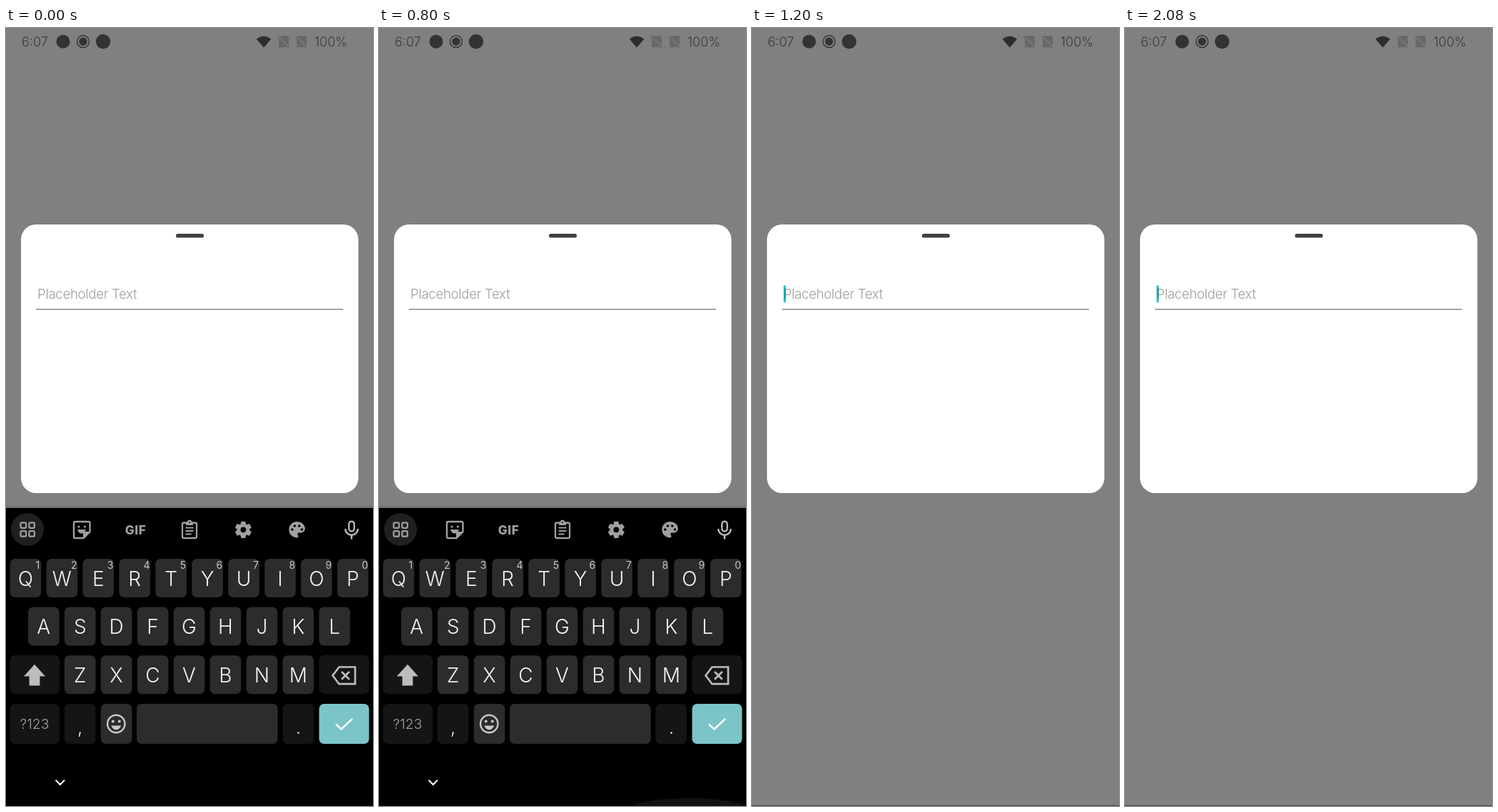
Write an HTML page with a canvas that moves like this. It is 514 px wide and 1089 px high and loops after 2560 ms.

```html
<!DOCTYPE html>
<html lang="en">
<head>
<meta charset="utf-8">
<title>Bottom sheet with keyboard</title>
<style>
  html, body { margin: 0; width: 100%; height: 100%; overflow: hidden; background: #808080; }
  canvas { display: block; width: 100%; height: 100%; }
</style>
</head>
<body>
<canvas id="stage" width="514" height="1089"></canvas>
<script>
const W = 514, H = 1089, LOOP = 2560, STEP = 80, KB_TOP = 672;
const FONT = 'Inter, "Liberation Sans", sans-serif';
const KEY = '#2c2c2c', DARK_KEY = '#151515', ICON = '#a0a0a0', BRIGHT = '#bcbcbc';
const PITCH = 50.93, KEY_W = 43.6, KEY_H = 54;

const screen = document.getElementById('stage').getContext('2d');
let g = screen;

function box(x, y, w, h, r, fill) {
  g.beginPath();
  g.roundRect(x, y, w, h, r);
  g.fillStyle = fill;
  g.fill();
}

function disc(x, y, r, fill) {
  g.beginPath();
  g.arc(x, y, r, 0, Math.PI * 2);
  g.fillStyle = fill;
  g.fill();
}

function stroke(path, color, width) {
  g.strokeStyle = color;
  g.lineWidth = width;
  g.stroke(new Path2D(path));
}

function fill(path, color) {
  g.fillStyle = color;
  g.fill(new Path2D(path));
}

function text(str, x, y, size, color, weight = 300, align = 'left', spacing = 0) {
  g.font = `${weight} ${size}px ${FONT}`;
  g.textAlign = align;
  g.letterSpacing = spacing + 'px';
  g.fillStyle = color;
  g.fillText(str, x, y);
  g.letterSpacing = '0px';
}

// Status bar and sheet

function noSim(x) {
  fill(`M${x + 4} 11H${x + 16}V25L${x + 2} 11ZM${x + 2} 14L${x + 14.5} 27H${x + 2}Z`, '#686868');
  stroke(`M${x} 11.5L${x + 16} 28`, '#686868', 1.2);
}

function statusBar() {
  text('6:07', 22, 26, 18, '#3a3a3a');
  disc(80, 19, 9.5, '#333');
  disc(108, 19, 5.7, '#333');
  g.beginPath();
  g.arc(108, 19, 8.5, 0, Math.PI * 2);
  g.strokeStyle = '#333';
  g.lineWidth = 1.4;
  g.stroke();
  disc(136, 19, 10.2, '#333');
  fill('M361 27.5L350.8 15.5Q361 7.5 371.2 15.5Z', '#2d2d2d');
  noSim(380);
  noSim(405);
  text('100%', 432, 26, 18, '#3a3a3a');
}

function sheet(cursorOn) {
  box(21, 275, 472.5, 376, 21, '#fff');
  box(238, 288, 39, 5.6, 2.5, '#414141');
  if (cursorOn) box(44.3, 360.5, 3, 23.5, 0, '#1cbfc3');
  text('Placeholder Text', 44, 379.3, 18.7, 'rgba(0,0,0,.39)', 300, 'left', -0.35);
  box(42, 393, 430, 1.5, 0, '#8c888a');
}

// Keyboard, drawn at its resting place

function gridIcon() {
  disc(30, 702, 23, '#202020');
  g.strokeStyle = ICON;
  g.lineWidth = 2.2;
  for (const x of [20.5, 32.3])
    for (const y of [692.3, 704.1]) {
      g.beginPath();
      g.roundRect(x, y, 7.6, 7.6, 1.8);
      g.stroke();
    }
}

function micIcon() {
  stroke('M480.3 694.3a3.7 3.7 0 0 1 7.4 0v6.4a3.7 3.7 0 0 1-7.4 0z', BRIGHT, 2.3);
  stroke('M475.2 701a8.8 8.8 0 0 0 17.6 0M484 710v5.5', BRIGHT, 2.4);
}

function tools() {
  // sticker
  stroke('M97 691H115.5Q117.5 691 117.5 693V705L108.5 714H97Q95 714 95 712V693Q95 691 97 691Z', ICON, 2.4);
  fill('M108 714V707Q108 705 110 705H118Z', ICON);
  disc(102, 698, 1.6, ICON);
  disc(110.5, 698, 1.6, ICON);
  fill('M100 702H112Q110 707.5 105.8 707.5T100 702Z', ICON);

  text('GIF', 181.5, 708.6, 17.2, ICON, 800, 'center', 0.6);

  // clipboard
  stroke('M249 692.5H265Q267 692.5 267 694.5V712Q267 714 265 714H249Q247 714 247 712V694.5Q247 692.5 249 692.5Z', ICON, 2.3);
  box(252, 691.5, 10, 4.5, 1, ICON);
  disc(257, 691.5, 3, ICON);
  disc(257, 692, 1, '#000');
  stroke('M251.5 699.5H262.5M251.5 704H262.5M251.5 708.5H259.5', ICON, 2);

  // gear
  for (let i = 0; i < 6; i++) {
    g.save();
    g.translate(332.3, 702.3);
    g.rotate(i * Math.PI / 3);
    fill('M-3 -11.6H3L4 -6H-4Z', ICON);
    g.restore();
  }
  disc(332.3, 702.3, 8.8, ICON);
  disc(332.3, 702.3, 3.9, '#000');

  // palette
  fill('M407.5 691A11.2 11.2 0 1 0 407.5 713.4C409.6 713.4 410 711.3 408.9 710C407.6 708.4 408.6 706.6 410.5 706.6H412.8C416.3 706.6 418.8 704 418.8 700.6C418.8 695.4 413.8 691 407.5 691Z', ICON);
  for (const [x, y] of [[400.8, 702], [404.3, 697], [410.7, 697], [414.4, 702]]) disc(x, y, 1.8, '#000');
}

function keyRow(letters, x, y, lower) {
  [...letters].forEach((c, i) => {
    const kx = x + i * PITCH;
    box(kx, y, KEY_W, KEY_H, 7, KEY);
    text(lower ? c.toLowerCase() : c, kx + KEY_W / 2, y + (lower ? 34 : 37.7), 28, '#f4f4f4', 300, 'center');
  });
}

function keyboard(lower) {
  box(0, KB_TOP, W, H - KB_TOP + 1, 0, '#000');
  gridIcon();
  micIcon();
  if (!lower) tools();

  keyRow('QWERTYUIOP', 5.6, 743, lower);
  [...'1234567890'].forEach((d, i) => text(d, 44.3 + i * PITCH, 756.5, 14, '#c8c8c8', 400, 'center'));
  keyRow('ASDFGHJKL', 31, 810.5, lower);
  keyRow('ZXCVBNM', 81.9, 878.3, lower);

  // shift
  box(5.6, 878, 69.4, KEY_H, 7, DARK_KEY);
  const arrow = 'M40 892L53 906.5H46.5V919.5H33.5V906.5H27Z';
  if (!lower) fill(arrow, BRIGHT);
  stroke(arrow, BRIGHT, lower ? 2.6 : 1.8);

  // backspace
  box(438.5, 878, 70, KEY_H, 7, DARK_KEY);
  stroke('M457.5 906.3L466.5 894.5H489V918.2H466.5Z', BRIGHT, 2.7);
  stroke('M470 901L480.8 911.8M480.8 901L470 911.8', BRIGHT, 2.7);

  const y = 946, h = 56;
  box(5.6, y, 69.4, h, 7, DARK_KEY);
  text('?123', 40, 981, 19.3, '#a4a4a4', 300, 'center');
  box(81.9, y, KEY_W, h, 7, DARK_KEY);
  text(',', 103.7, 988, 26, '#eee', 300, 'center');
  box(132.8, y, KEY_W, h, 7, KEY);
  g.beginPath();
  g.arc(154.3, 974, 12.2, 0, Math.PI * 2);
  g.strokeStyle = '#c8c8c8';
  g.lineWidth = 2.4;
  g.stroke();
  disc(149.8, 970.5, 2, '#c8c8c8');
  disc(158.8, 970.5, 2, '#c8c8c8');
  fill('M147.3 976.5H161.3Q159 982.3 154.3 982.3T147.3 976.5Z', '#c8c8c8');
  box(183, y, 197.6, h, 7, KEY);
  box(387.6, y, KEY_W, h, 7, DARK_KEY);
  text('.', 409.3, 988, 26, '#eee', 300, 'center');
  box(438.5, y, 70, h, 7, '#7bc4c7');
  stroke('M462 974.5L469.5 981.5L485 967', '#fff', 2.5);

  if (!lower) stroke('M69.5 1052.8L75.8 1059L82 1052.8', '#fff', 2);
}

function layer(lower) {
  const c = document.createElement('canvas');
  c.width = W;
  c.height = H;
  g = c.getContext('2d');
  keyboard(lower);
  g = screen;
  return c;
}

const upperKeys = layer(false), lowerKeys = layer(true);

function keyboardPose(t) {
  if (t < 880) return { keys: upperKeys, dy: 0, alpha: 1 };
  if (t < 960) return { keys: lowerKeys, dy: 35, alpha: 0.67 };
  if (t < 1120) return { keys: lowerKeys, dy: 279, alpha: 0.11 };
  return null;
}

// Touch ripple rising past the bottom edge: start, x, rx, ry, alpha
const RIPPLE = [[720, 435, 60, 8, 0.2], [800, 435, 92, 20, 0.25], [880, 435, 87, 40, 0.25], [960, 432, 66, 40, 0.1]];

function ripple(t) {
  const now = t < 1120 && RIPPLE.findLast(r => t >= r[0]);
  if (!now) return;
  const [, x, rx, ry, a] = now;
  g.beginPath();
  g.ellipse(x, H - 1 + ry / 2, rx, ry, 0, 0, Math.PI * 2);
  g.fillStyle = `rgba(68,68,68,${a})`;
  g.fill();
}

const cursorOn = t => (t >= 80 && t < 560) || (t >= 1120 && t < 1600) || t >= 2080;

function draw(t) {
  box(0, 0, W, H, 0, '#808080');
  box(0, H - 1, W, 1, 0, '#444');
  statusBar();
  sheet(cursorOn(t));
  const pose = keyboardPose(t);
  if (pose) {
    if (pose.dy === 0) {
      const shade = g.createLinearGradient(0, KB_TOP - 4, 0, KB_TOP);
      shade.addColorStop(0, 'rgba(0,0,0,0)');
      shade.addColorStop(1, 'rgba(0,0,0,.18)');
      box(0, KB_TOP - 4, W, 4, 0, shade);
    }
    g.globalAlpha = pose.alpha;
    g.drawImage(pose.keys, 0, pose.dy);
    g.globalAlpha = 1;
  }
  ripple(t);
}

const start = performance.now();
function tick() {
  const t = (performance.now() - start) % LOOP;
  draw(Math.floor(t / STEP) * STEP);
  requestAnimationFrame(tick);
}
tick();
</script>
</body>
</html>
```
